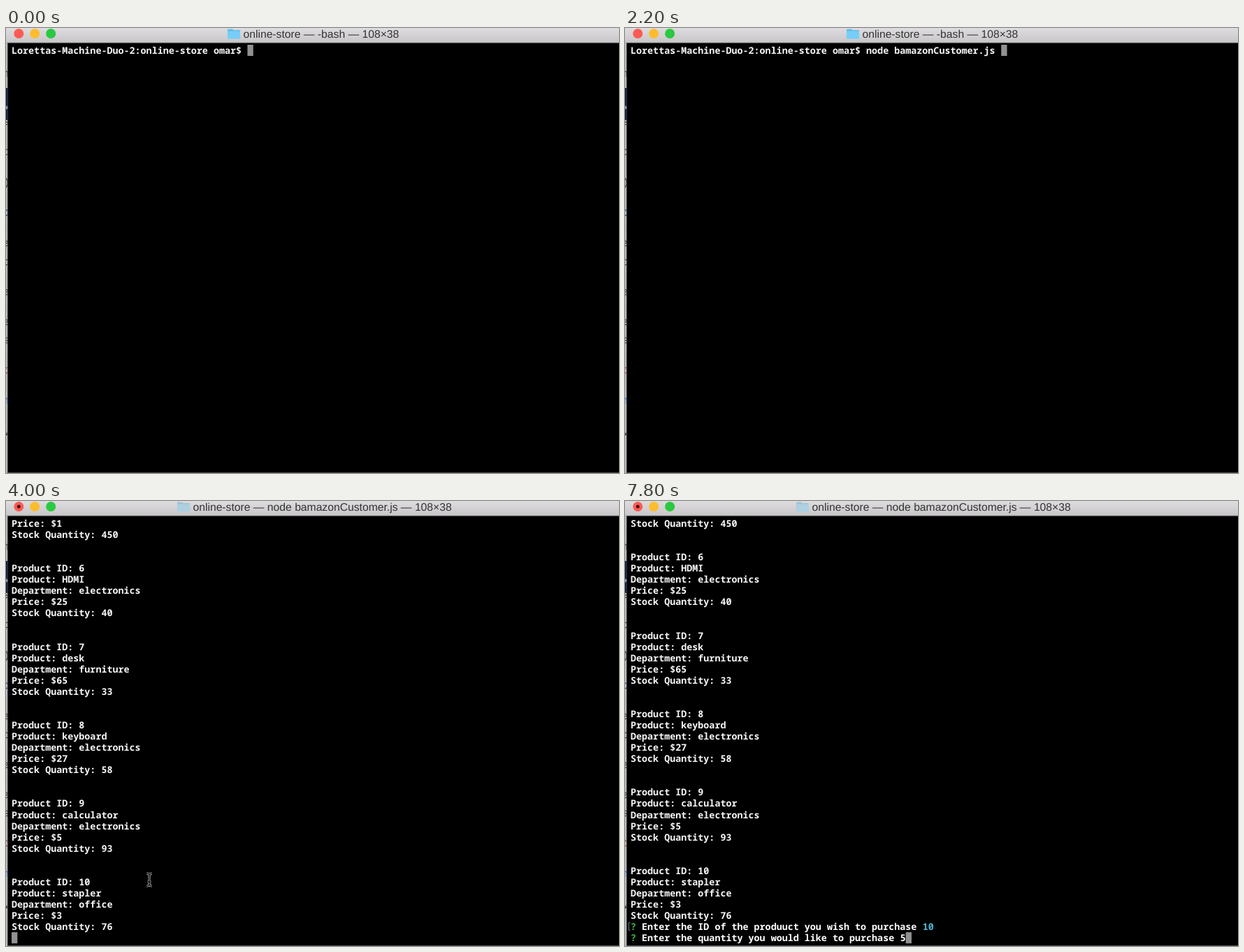
Recreate the animation shown at these times as an HTML page with a canvas. Size 877 by 638 pixels, loop 8000 ms.

```html
<!DOCTYPE html>
<html lang="en">
<head>
<meta charset="utf-8">
<title>Terminal</title>
<style>
  html, body { margin: 0; width: 100%; height: 100%; overflow: hidden; background: #000; }
  canvas { display: block; width: 877px; height: 638px; }
</style>
</head>
<body>
<canvas id="stage"></canvas>
<script>
const W = 877, H = 638, LOOP = 8000;
const canvas = document.getElementById('stage');
const ctx = canvas.getContext('2d');
const dpr = window.devicePixelRatio || 1;
canvas.width = W * dpr;
canvas.height = H * dpr;
ctx.scale(dpr, dpr);
ctx.textRendering = 'geometricPrecision';

const MONO = '13.39px "Noto Sans Mono", "DejaVu Sans Mono", monospace';
const SANS = '15.7px "Liberation Sans", Arial, sans-serif';
const LEFT = 8, TOP = 24, CELL = 8.034, ROW = 16.06;
const WHITE = '#f6f6f6', GREEN = '#35b449', CYAN = '#4fb5d3';

const PROMPT = 'Lorettas-Machine-Duo-2:online-store omar$ ';
const COMMAND = 'node bamazonCustomer.js ';
const ASK_ID = 'Enter the ID of the produuct you wish to purchase ';
const ASK_COUNT = 'Enter the quantity you would like to purchase ';

// [time, characters typed]
const TYPING = [[0, 0], [200, 1], [400, 3], [600, 5], [800, 7], [1000, 8],
  [1200, 10], [1400, 11], [1600, 12], [1800, 13], [2000, 24]];
const ID_KEYS = [[0, 0], [4800, 1], [5000, 2]];
const COUNT_KEYS = [[0, 0], [7600, 1]];

const PRODUCTS = [
  [6, 'HDMI', 'electronics', 25, 40],
  [7, 'desk', 'furniture', 65, 33],
  [8, 'keyboard', 'electronics', 27, 58],
  [9, 'calculator', 'electronics', 5, 93],
  [10, 'stapler', 'office', 3, 76]
];
const LISTING = ['Price: $1', 'Stock Quantity: 450'];
for (const [id, name, dept, price, stock] of PRODUCTS) {
  LISTING.push('', '', `Product ID: ${id}`, `Product: ${name}`,
    `Department: ${dept}`, `Price: $${price}`, `Stock Quantity: ${stock}`);
}

// Letters of the page behind the window: [y, letter, colour]
const BEHIND = [[70, 'n', '#333'], [139, 's', '#333'], [182, 'c', '#333'],
  [226, ')', '#333'], [269, 'c', '#1c3566'], [313, 'e', '#333'],
  [340, 'c', '#333'], [383, 'e', '#333'], [426, 'e', '#333'],
  [452, 's', '#333'], [495, 'c', '#a03030'], [539, 'n', '#3060b0'], [584, 'w', '#333']];

const typed = (keys, t) => keys.filter(k => k[0] <= t).pop()[1];

function rect(x, y, w, h, color) {
  ctx.fillStyle = color;
  ctx.fillRect(x, y, w, h);
}

function disc(x, y, r, color) {
  ctx.fillStyle = color;
  ctx.beginPath();
  ctx.arc(x, y, r, 0, Math.PI * 2);
  ctx.fill();
}

function text(str, col, row, color = WHITE, weight = 600) {
  ctx.font = `${weight} ${MONO}`;
  ctx.fillStyle = color;
  ctx.fillText(str, LEFT + col * CELL, Math.round(TOP + row * ROW + 13));
}

function caret(col, row) {
  rect(LEFT + col * CELL, TOP + row * ROW, 8.3, 16, '#919191');
}

function mark(row) {
  const y = Math.round(TOP + row * ROW) + 2.5;
  ctx.strokeStyle = '#777';
  ctx.lineWidth = 1;
  ctx.beginPath();
  ctx.moveTo(7.5, y);
  ctx.lineTo(5.5, y);
  ctx.lineTo(5.5, y + 11);
  ctx.lineTo(7.5, y + 11);
  ctx.stroke();
}

function question(str, answer, row, color) {
  text('?', 0, row, GREEN, 700);
  text(str, 2, row, '#fff', 700);
  text(answer, 2 + str.length, row, color);
}

function folder(x, body, tab) {
  ctx.fillStyle = tab;
  ctx.beginPath();
  ctx.roundRect(x, 1.5, 8, 5, 1.5);
  ctx.roundRect(x, 3, 18, 5, 1);
  ctx.fill();
  ctx.fillStyle = body;
  ctx.beginPath();
  ctx.roundRect(x, 4.5, 18, 11, 1);
  ctx.fill();
}

function titleBar(busy) {
  const g = ctx.createLinearGradient(0, 0, 0, 21);
  g.addColorStop(0, '#dedcde');
  g.addColorStop(1, '#c8c6c8');
  rect(0, 0, W, 21, g);
  rect(0, 20.5, W, 1, '#a5a4a5');
  disc(18.3, 8, 7, '#fc5b53');
  disc(41.2, 8, 7, '#fdbc2e');
  disc(64.2, 8, 7, '#29c941');
  if (busy) disc(18.3, 8, 2.5, '#4d0c08');
  const x = busy ? 245 : 317;
  if (busy) folder(x, '#aed0e1', '#9dc3d6');
  else folder(x, '#76cdf8', '#5fbcea');
  ctx.font = SANS;
  ctx.fillStyle = '#333';
  const task = busy ? COMMAND.trim() : '-bash';
  ctx.fillText(`online-store — ${task} — 108×38`, x + 22.5, 14);
}

function backdrop() {
  rect(0, 0, W, H, '#000');
  const g = ctx.createLinearGradient(0, 0, 3, 0);
  g.addColorStop(0, '#c9cbcd');
  g.addColorStop(1, '#8c8e90');
  rect(0, 21, 2.5, H - 21, g);
  rect(0, 86, 2.5, 46, '#14203f');
  ctx.save();
  ctx.beginPath();
  ctx.rect(0, 21, 2.5, H);
  ctx.clip();
  ctx.font = SANS;
  ctx.textAlign = 'right';
  for (const [y, letter, color] of BEHIND) {
    ctx.fillStyle = color;
    ctx.fillText(letter, 4, y);
  }
  ctx.restore();
  disc(0, 114, 2.5, '#8d939f');
  rect(2.5, 637, W, 1, '#4a4a4a');
}

function pointer(x, y) {
  const path = new Path2D();
  for (const s of [-1, 1]) {
    path.moveTo(x - 4, y + s * 9);
    path.quadraticCurveTo(x, y + s * 9, x, y + s * 6);
    path.quadraticCurveTo(x, y + s * 9, x + 4, y + s * 9);
  }
  path.moveTo(x, y - 6);
  path.lineTo(x, y + 6);
  path.moveTo(x - 2.5, y + 3);
  path.lineTo(x + 2.5, y + 3);
  ctx.strokeStyle = '#b8b8b8';
  ctx.lineWidth = 3;
  ctx.stroke(path);
  ctx.strokeStyle = '#080808';
  ctx.lineWidth = 1.3;
  ctx.stroke(path);
}

function shell(t) {
  const n = typed(TYPING, t);
  text(PROMPT + COMMAND.slice(0, n), 0, 0);
  if (t < 2800) {
    caret(PROMPT.length + n, 0);
  } else {
    mark(0);
    caret(0, 1);
  }
}

function store(t) {
  const scroll = t >= 5800 ? 1 : 0;
  LISTING.slice(scroll).forEach((line, row) => text(line, 0, row));
  if (t < 4400) {
    caret(0, 37);
  } else if (!scroll) {
    const answer = '10'.slice(0, typed(ID_KEYS, t));
    question(ASK_ID, answer, 37, WHITE);
    caret(2 + ASK_ID.length + answer.length, 37);
  } else {
    const answer = '5'.slice(0, typed(COUNT_KEYS, t));
    mark(36);
    question(ASK_ID, '10', 36, CYAN);
    question(ASK_COUNT, answer, 37, WHITE);
    caret(2 + ASK_COUNT.length + answer.length, 37);
  }
  if (t >= 3400 && t < 4800) pointer(205, 543);
}

function draw(t) {
  backdrop();
  titleBar(t >= 3000);
  if (t < 3200) shell(t);
  else store(t);
}

const start = performance.now();
function tick() {
  draw((performance.now() - start) % LOOP);
  requestAnimationFrame(tick);
}
tick();
</script>
</body>
</html>
```
